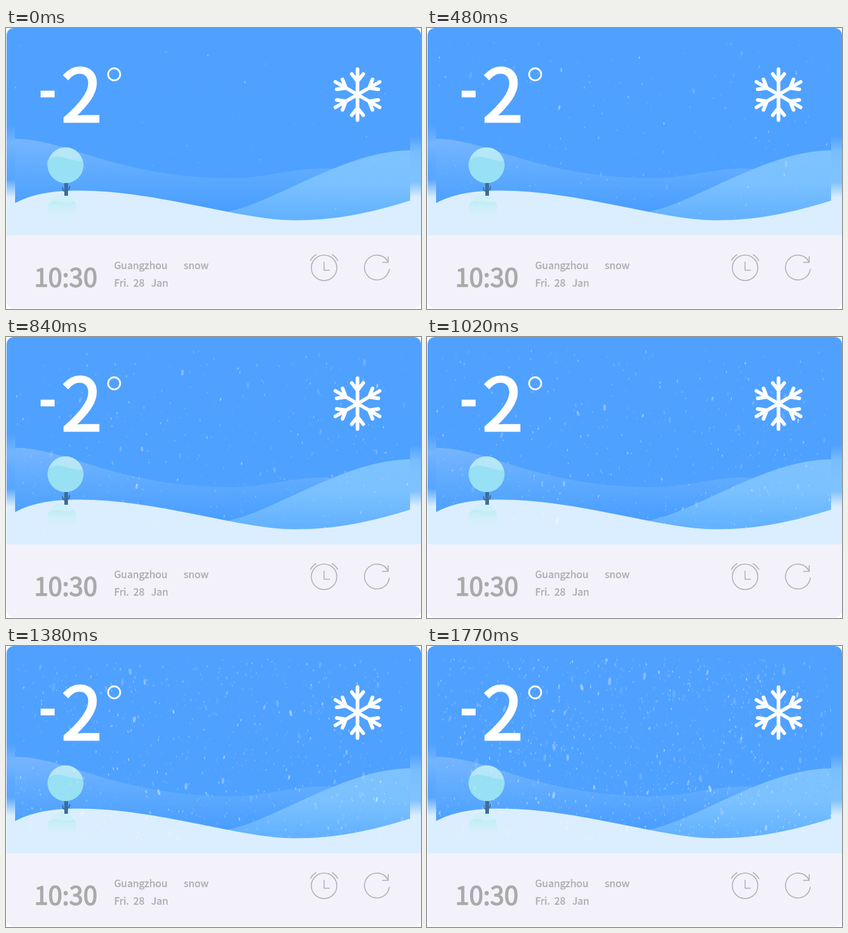
These frames come from a looping animation (683 px wide and 464 px high, 1.8 s). An HTML page with a canvas:

```html
<!DOCTYPE html>
<html lang="en">
<head>
<meta charset="utf-8">
<title>Snow weather card</title>
<style>
html, body { margin: 0; width: 100%; height: 100%; overflow: hidden; background: #fff; }
canvas { display: block; }
</style>
</head>
<body>
<canvas id="stage" width="683" height="464"></canvas>
<script>
const ctx = document.getElementById('stage').getContext('2d');
const LOOP = 1800, STEP = 30, TAU = Math.PI * 2;
const FONT = '"Noto Sans CJK SC", "Noto Sans CJK JP", "Noto Sans CJK", "Open Sans", sans-serif';
const SNOW = '#dbeeff', GRAY = '#acacad';

function fade(y0, y1, ...stops) {
  const g = ctx.createLinearGradient(0, y0, 0, y1);
  stops.forEach((c, i) => g.addColorStop(i / (stops.length - 1), c));
  return g;
}

function shape(d, fill) {
  ctx.fillStyle = fill;
  ctx.fill(new Path2D(d));
}

function box(x, y, w, h, fill) {
  ctx.fillStyle = fill;
  ctx.fillRect(x, y, w, h);
}

function ring(x, y, r, a = 0, b = TAU) {
  ctx.beginPath();
  ctx.arc(x, y, r, a, b);
  ctx.stroke();
}

function lines(d, color, width, cap = 'butt') {
  ctx.strokeStyle = color;
  ctx.lineWidth = width;
  ctx.lineCap = ctx.lineJoin = cap === 'round' ? 'round' : cap && 'miter';
  ctx.lineCap = cap;
  ctx.stroke(new Path2D(d));
}

// A thin outline gives the medium weight
function text(s, x, y, size, bold, color) {
  ctx.font = `400 ${size}px ${FONT}`;
  ctx.fillStyle = ctx.strokeStyle = color;
  ctx.lineWidth = bold;
  ctx.lineJoin = 'miter';
  ctx.fillText(s, x, y);
  ctx.strokeText(s, x, y);
}

// Ball with a lighter cap above a wavy body
function ball(x, y, r, cap, wave, body) {
  ctx.save();
  ctx.beginPath();
  ctx.arc(x, y, r, 0, TAU);
  ctx.fillStyle = cap;
  ctx.fill();
  ctx.clip();
  ctx.translate(x, y);
  shape(wave, body);
  ctx.restore();
}

function land() {
  box(0, 0, 683, 343, fade(0, 343, '#50a1ff', '#4fa1ff', '#4da1ff'));
  // Soft strips beside the scene
  box(0, 160, 15, 183, fade(160, 280, '#4fa0ff', '#74b5ff', '#60aaff', '#58a6ff', SNOW));
  box(665, 178, 18, 165, fade(178, 280, '#4fa0ff', '#78bdff', '#7cc1ff', '#80c2ff', SNOW));

  ctx.save();
  ctx.beginPath();
  ctx.rect(15, 0, 650, 343);
  ctx.clip();
  shape('M15 183C100 183 180 247 372 248C425 248 470 232 520 232C570 232 620 245 665 250V343H15Z',
    fade(183, 300, '#77b5ff', '#5daaff', '#4a9eff'));
  shape('M366 303C440 289 560 202 665 202V343H366Z', fade(203, 310, '#7ec3ff', '#7ac1ff', '#64b2ff'));
  shape('M15 289C45 273 80 268.5 120 268.5C250 268.5 385 317.5 475 317.5' +
    'C545 317.5 600 305 665 285V343H15Z', SNOW);
  ctx.restore();
}

function tree() {
  ball(92, 299, 24, fade(276, 318, '#cdf0f7', SNOW), 'M-24-8C-8-22 8-2 24-16V24H-24Z',
    fade(-15, 12, 'rgba(178,236,240,.8)', 'rgba(219,238,255,0)'));
  box(96, 254, 6, 23, '#3d6d98');
  lines('M93 264L94 268L98 270M104.5 262L104 266L101 268', '#3d6d98', 2, 'round');
  ball(98, 226.5, 29.5, fade(197, 240, '#b9e8f8', '#a9e3f5'),
    'M-30-7C-10-24 6-4 30-7V30H-30Z', '#98e0f3');
}

function seeded(seed) {
  return () => {
    seed = seed + 0x6D2B79F5 | 0;
    let t = Math.imul(seed ^ seed >>> 15, 1 | seed);
    t = t + Math.imul(t ^ t >>> 7, 61 | t) ^ t;
    return ((t ^ t >>> 14) >>> 0) / 4294967296;
  };
}

// Births speed up through the loop; near flakes are big and fast
const rnd = seeded(28);
const flakes = Array.from({ length: 1500 }, () => {
  const near = rnd() < 0.04 ? 1 : rnd() * 0.3;
  return {
    birth: 2.3 * Math.sqrt(rnd()) - 0.5,
    x: 15 + rnd() * 650,
    y: rnd() * 298,
    vx: (rnd() - 0.5) * 24,
    vy: 80 + near * 240,
    size: 0.5 + near * (1 + rnd()),
    tilt: (rnd() - 0.5) * 0.6,
    alpha: 0.1 + 0.36 * rnd() ** 2
  };
});

function snow(t) {
  ctx.save();
  ctx.beginPath();
  ctx.rect(15, 21, 650, 298);
  ctx.clip();
  ctx.fillStyle = '#fff';
  for (const f of flakes) {
    const age = t - f.birth;
    if (age <= 0) continue;
    const r = f.size * (0.8 + 0.3 * age);
    ctx.globalAlpha = f.alpha * Math.min(1, age / 0.2);
    ctx.beginPath();
    ctx.ellipse(f.x + f.vx * age, 21 + (f.y + f.vy * age) % 298, r, r * 2.4, f.tilt, 0, TAU);
    ctx.fill();
  }
  ctx.restore();
}

function reading() {
  box(57, 103.5, 23, 11, '#fff');
  text('2', 91, 155, 121, 3.2, '#fff');
  ctx.lineWidth = 2.8;
  ring(178, 76.5, 10);

  ctx.save();
  ctx.translate(578.5, 110);
  for (let i = 0; i < 6; i++) {
    lines('M0 0V-42M-9.5-34L0-22L9.5-34', '#fff', 6, 'round');
    ctx.rotate(TAU / 6);
  }
  ctx.restore();
}

function panel() {
  box(0, 342.4, 683, 122, '#f3f2fb');
  text('10:30', 46.5, 426.5, 41.5, 1.5, '#aaa');
  text('Guangzhou', 178, 398, 16.5, 0.4, GRAY);
  text('snow', 292.5, 398, 16.5, 0.4, GRAY);
  text('Fri.', 178, 426.5, 16.5, 0.4, GRAY);
  text('28', 209.5, 426.5, 16.5, 0.4, GRAY);
  text('Jan', 239, 426.5, 16.5, 0.4, GRAY);

  lines('M523.5 386V400H533M629 377V387H619', '#b0b0b3', 1.6);
  ring(523.5, 396, 21);
  ring(523.5, 396, 25.5, -2.67, -2.1);
  ring(523.5, 396, 25.5, -1.04, -0.47);
  ring(610.5, 395.5, 20.5, 0.1, TAU - 0.47);
}

function draw(ms) {
  let k = Math.floor(ms / STEP);
  if (k % 6 === 1) k--; // the first pose of every six holds twice as long
  ctx.clearRect(0, 0, 683, 464);
  ctx.save();
  ctx.beginPath();
  ctx.roundRect(1, 0, 682, 463, 12);
  ctx.clip();
  land();
  tree();
  snow(k * STEP / 1000);
  reading();
  panel();
  ctx.restore();
}

const start = performance.now();
function tick() {
  draw((performance.now() - start) % LOOP);
  requestAnimationFrame(tick);
}
tick();
</script>
</body>
</html>
```
